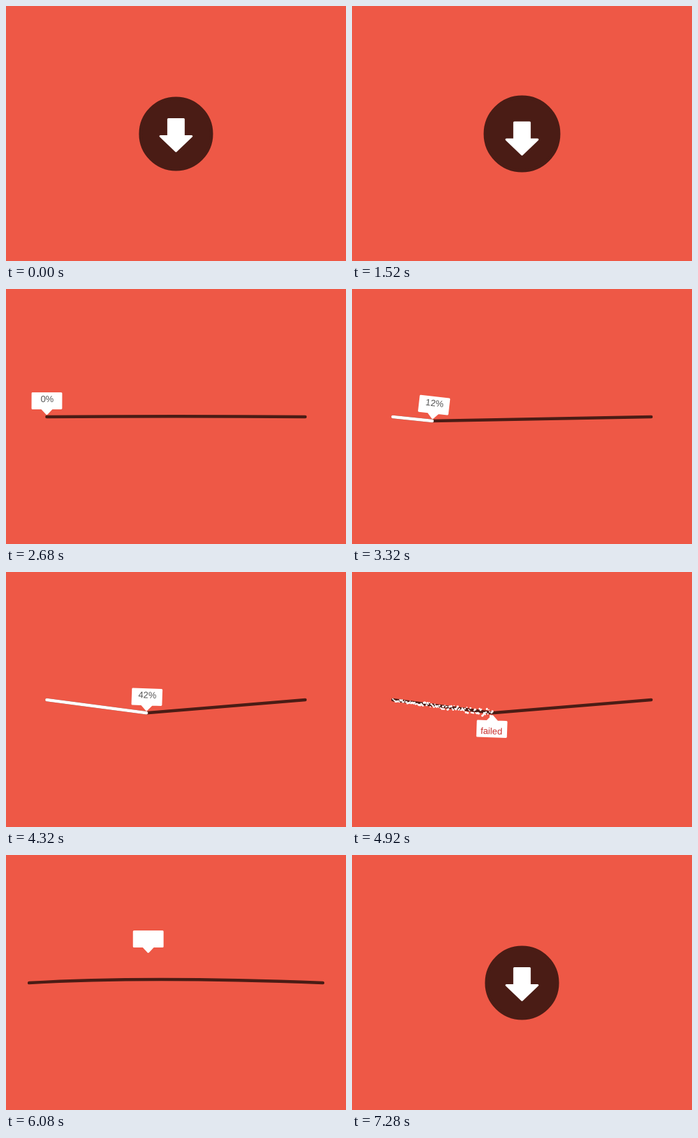
An HTML page with a canvas for the animation above (8000 ms loop, 500 by 375 pixels).

```html
<!DOCTYPE html>
<html lang="en">
<head>
<meta charset="utf-8">
<title>Download progress</title>
<style>
html, body { margin: 0; width: 100%; height: 100%; overflow: hidden; background: #ee5846; }
canvas { display: block; }
</style>
</head>
<body>
<canvas id="stage" width="500" height="375"></canvas>
<script>
const ctx = document.getElementById('stage').getContext('2d');
const LOOP = 8000, STEP = 40;
const BG = '#ee5846', DARK = '#4a1c15', WHITE = '#fff';
const CX = 250, BASE = 188, RADIUS = 52.2, HALF = 190, STROKE = 4.6;
const LEFT = CX - HALF, STOP_X = 206.5;

// Times of the main events, in ms
const PRESS = 1440, JUMP = 1576, LAND = 2280, RUN = 2800, RUN_END = 4000;
const FAIL = 4600, CRUMBLE = 4860, RESET = 5720, LEAP = 5980, HOME = 6480;

const clamp = v => Math.min(1, Math.max(0, v));
const span = (t, from, to) => clamp((t - from) / (to - from));
const mix = (a, b, k) => a + (b - a) * k;
const inOut = k => (1 - Math.cos(Math.PI * k)) / 2;
const out = k => 1 - (1 - k) ** 3;
const wobble = (t, start, amp, period, decay) => t < start ? 0 :
  amp * Math.sin(2 * Math.PI * (t - start) / period) * Math.exp(-(t - start) / decay);
const degrees = (dy, dx) => Math.atan2(dy, dx) * 180 / Math.PI;

function seeded(seed) {
  return () => (seed = (seed * 16807) % 2147483647) / 2147483647;
}
const random = seeded(77);
const dots = Array.from({ length: 110 }, (_, i) => ({
  along: i / 109,
  offset: (random() - 0.5) * (3 + 9 * i / 109),
  size: 0.9 + random() * 0.9,
  weight: 0.4 + random() * 0.8
}));

function progressAt(t) {
  return inOut(span(t, RUN, RUN_END));
}

// The line: half width, half height, and the point where it is pulled
function lineAt(t) {
  let rx, ry, sag, x = CX;
  if (t < RESET) {
    const press = 2 * Math.sin(Math.PI * span(t, PRESS, JUMP));
    rx = mix(RADIUS, HALF, out(span(t, 1590, 1880))) + press;
    ry = (RADIUS + press) * (1 - span(t, 1550, 1740) ** 2);
  } else {
    const pulse = wobble(t, 6440, 9.5, 240, 110);
    const stretched = mix(HALF, 216, out(span(t, LEAP - 20, 6080)));
    rx = mix(stretched, RADIUS, inOut(span(t, 6110, 6450))) + pulse;
    ry = RADIUS * span(t, 6270, 6450) ** 1.5 + pulse;
  }
  if (t < RUN) {
    sag = t < LAND ? wobble(t, 1600, -16, 213, 200) : wobble(t, LAND, 9, 240, 170);
  } else {
    const share = progressAt(t);
    x = mix(LEFT, STOP_X, share);
    sag = 19.3 * share ** 1.27;
    if (t > LEAP - 20) {
      const age = t - LEAP + 20;
      sag = 20 * Math.cos(2 * Math.PI * age / 220) * Math.exp(-age / 90);
    }
  }
  return { rx, ry, sag, x, taut: t >= RUN && t < LEAP };
}

function drawLine(t, line) {
  const { rx, ry, sag, x } = line;
  ctx.lineWidth = STROKE;
  ctx.strokeStyle = ctx.fillStyle = DARK;
  ctx.beginPath();
  if (ry > 0.3) {
    ctx.ellipse(CX, BASE, rx, ry, 0, 0, 2 * Math.PI);
    ctx.fill();
  } else {
    ctx.moveTo(CX - rx, BASE);
    if (line.taut) {
      ctx.lineTo(x, BASE + sag);
      ctx.lineTo(CX + rx, BASE);
    } else {
      ctx.quadraticCurveTo(x, BASE + 2 * sag, CX + rx, BASE);
    }
  }
  ctx.stroke();

  if (t > RUN && t < CRUMBLE) {
    ctx.strokeStyle = WHITE;
    ctx.beginPath();
    ctx.moveTo(LEFT, BASE);
    ctx.lineTo(x, BASE + sag);
    ctx.stroke();
  }
}

function drawDots(t, { x, sag }) {
  const age = t - CRUMBLE;
  if (age < 0 || age > 650) return;
  ctx.fillStyle = WHITE;
  ctx.globalAlpha = 1 - (age / 650) ** 2;
  for (const dot of dots) {
    const fall = 1.5e-4 * age * age * dot.weight;
    ctx.beginPath();
    ctx.arc(mix(LEFT, x, dot.along), BASE + sag * dot.along + dot.offset + fall,
      dot.size, 0, 2 * Math.PI);
    ctx.fill();
  }
  ctx.globalAlpha = 1;
}

// Pivot, tilt and shape of the marker; shape 0 is the arrow, 1 the label
function markerAt(t, line) {
  if (t < JUMP) {
    return { x: CX, y: 218 + 5 * Math.sin(Math.PI * span(t, PRESS, JUMP)), tilt: 0, shape: 0 };
  }
  if (t < LAND) {
    const p = span(t, JUMP, LAND);
    return {
      x: LEFT + HALF * (1 - p) ** 1.44,
      y: 58 + ((t - 1946) / 29.3) ** 2,
      tilt: -22 * p * (1 - p),
      shape: p ** 1.5
    };
  }
  if (t < RUN) {
    return { x: LEFT, y: BASE, tilt: wobble(t, LAND, 6, 280, 150), shape: 1 };
  }
  if (t < LEAP) {
    const { x, sag } = line;
    const slope = (degrees(sag, x - LEFT + 0.01) - degrees(sag, CX + HALF - x)) / 2;
    const speed = Math.sin(Math.PI * span(t, RUN, RUN_END));
    const flip = 180 * (inOut(span(t, FAIL, 4760)) - inOut(span(t, RESET, 5950)));
    const swing = t < RESET ? wobble(t, 4760, 14, 320, 150) : 0;
    const settle = 1 - span(t, RESET, 5950);
    return { x, y: BASE + sag, tilt: flip + swing + (slope + 4 * speed + 0.6 * progressAt(t)) * settle, shape: 1 };
  }
  const p = span(t, LEAP, HOME);
  return {
    x: mix(STOP_X + 1, CX, p * p),
    y: t < HOME ? 114 + ((t - 6224) / 25.1) ** 2 : 218,
    tilt: 0,
    shape: 1 - inOut(span(t, 6090, 6430))
  };
}

function drawText(text, color, alpha, upsideDown) {
  ctx.save();
  ctx.translate(0.5, -23.5);
  if (upsideDown) ctx.rotate(Math.PI);
  ctx.globalAlpha = alpha;
  ctx.fillStyle = color;
  ctx.font = '13.3px "Liberation Sans", Arial, sans-serif';
  ctx.textAlign = 'center';
  ctx.fillText(text, 0, 4.7);
  ctx.restore();
}

function drawMarker(t, line) {
  const { x, y, tilt, shape } = markerAt(t, line);
  const body = mix(11.3, 21, Math.sqrt(shape));
  const wing = mix(23, 7.5, shape);
  const neck = -mix(23.5, 9.5, shape);
  const top = -mix(48.5, 31.5, shape * shape);
  const side = [[wing, neck], [body, neck], [body, top]];
  const mirrored = side.map(([px, py]) => [-px, py]).reverse();

  ctx.save();
  ctx.translate(x, y);
  ctx.rotate(tilt * Math.PI / 180);
  ctx.translate(0, -3);
  ctx.beginPath();
  ctx.moveTo(0, -1.5);
  for (const point of [...side, ...mirrored]) ctx.lineTo(...point);
  ctx.closePath();
  ctx.fillStyle = ctx.strokeStyle = WHITE;
  ctx.lineWidth = 3;
  ctx.fill();
  ctx.stroke();

  if (t >= LAND + 120 && t < 4680) {
    const percent = Math.round(42 * progressAt(t - 90));
    drawText(percent + '%', '#555', span(t, LAND + 120, LAND + 320), false);
  } else if (t >= 4680 && t < 5840) {
    drawText('failed', '#c9302c', 1 - span(t, RESET, 5840), true);
  }
  ctx.restore();
}

function render(now) {
  const t = Math.floor((now % LOOP) / STEP) * STEP;
  const line = lineAt(t);
  ctx.lineCap = ctx.lineJoin = 'round';
  ctx.fillStyle = BG;
  ctx.fillRect(0, 0, 500, 375);
  drawLine(t, line);
  drawDots(t, line);
  drawMarker(t, line);
}

const start = performance.now();
function tick() {
  render(performance.now() - start);
  requestAnimationFrame(tick);
}
tick();
</script>
</body>
</html>
```
